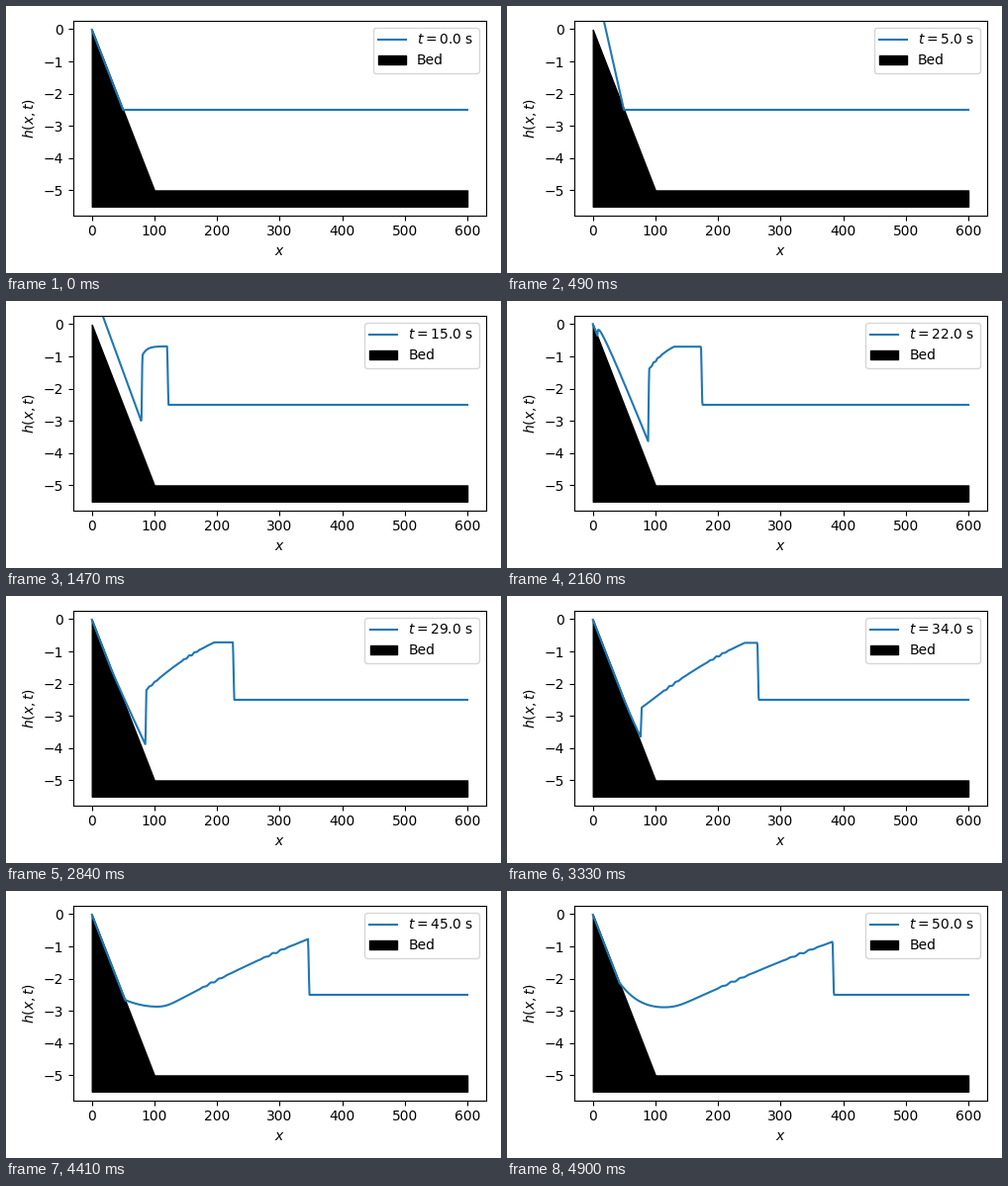
Recreate the animation shown at these times as a matplotlib script. Size 500 by 270 pixels, loop 5000 ms.

```python
import numpy as np
import matplotlib.pyplot as plt
from matplotlib.animation import FuncAnimation

TICK_MS = 20
TICKS = 250
SECOND_MS = 98       # screen time of one model second
CELLS, LENGTH = 1000, 600
STILL = -2.5         # level of the water at rest
FLOOR = -5.5
TROUGH = -2.92
HIT = 5              # time at which the inflow meets the still water

x = (np.arange(CELLS) + .5) * LENGTH / CELLS
bed = np.maximum(-.05 * x, -5)


def ramp(start, width):
    return np.clip((x - start) / width, 0, 1)


def smooth_max(a, b, blend):
    return (a + b + np.hypot(a - b, blend)) / 2


def jump_at(t):
    """Foot of the sheet: runs down the slope, slows, then retreats."""
    d = t - 25
    back = .1 * d**2 if d < 0 else np.hypot(8.8, 2.2 * d) - 8.8
    return min(10 * t, 89.4 - back)


def bore_at(t):
    return 9 + 7.5 * t


def sheet_level(t, jump):
    """Thin flow on the slope, drying from the top once the inflow stops."""
    s = np.clip(x / max(jump, 1e-9), 0, 1)
    age = max(t - HIT, 0)
    inflow = 1.8 * np.exp(-(age / 6.3)**1.5)
    foot = .96 * np.exp(-((t - 16) / 13.9)**2) * (1 - np.exp(-age / 1.8))
    dry = min(.035 * (t - 19.5), .9)
    power = .0075 * max(t - 16, 0)**2
    tail = np.clip((s - dry) / (1 - dry), 0, 1)**power
    return bed + inflow * (1 - s) + foot * tail


def ripples(t):
    """Two packets of stair-like ripples that lengthen as they travel."""
    total = np.zeros(CELLS)
    wave = .3 * t
    for speed in (6.2, 8.4):
        centre = speed * t - 86
        size = .025 * np.clip((centre - 80) / 20, 0, 1)
        d = (x - centre) / wave
        total -= size * np.sin(2 * np.pi * d) * np.exp(-(d / 1.4)**2)
    return total


def wave_level(t, jump):
    """Flat crest behind the bore, then a fall to the trough at the slope."""
    crest = -.7 - .003 * (t - 22) - .6 * np.exp(-(t - 6) / 2.2)
    d = np.maximum(130 + 9.4 * (t - 22) - x, 0)
    slope = .0091 - 3.2e-6 * (t - 24)**2
    bend = .85 / max(t - 15.5, 1.5)**2
    level = smooth_max(crest - slope * d * (1 + bend * d), TROUGH, .15)

    dip = .36 * np.exp(-((t - 14) / 6)**2)
    level -= dip * np.exp(-np.maximum(x - jump, 0) / 7)
    climb = max(-.05 * jump - TROUGH, 0) if t > 25 else 0
    level += climb * (1 - ramp(jump, 90))**3
    return np.maximum(level + ripples(t), bed)


def surface(t):
    jump = jump_at(t)
    sheet = sheet_level(t, jump)
    if t <= HIT:
        return np.maximum(sheet, STILL)
    level = sheet + (wave_level(t, jump) - sheet) * ramp(jump, 1.5)
    return level + (STILL - level) * ramp(bore_at(t) - 1, 2)


def clock(t):
    return f"$t = {t:.1f}$ s"


fig, ax = plt.subplots(figsize=(5, 2.7), dpi=100)
line, = ax.plot(x, surface(0), label=clock(0))
ax.fill_between(x, FLOOR, bed, color="k", label="Bed")
ax.set_xlabel("$x$")
ax.set_ylabel("$h(x,t)$")
legend = ax.legend(loc="upper right")
fig.tight_layout()


def update(tick):
    # Whole seconds only; the offset rounds each change to the tick before it.
    t = (tick * TICK_MS + 15) // SECOND_MS
    line.set_ydata(surface(t))
    legend.get_texts()[0].set_text(clock(t))
    return line, legend


anim = FuncAnimation(fig, update, frames=TICKS, interval=TICK_MS,
                     repeat=True, repeat_delay=0)
plt.show()
```
